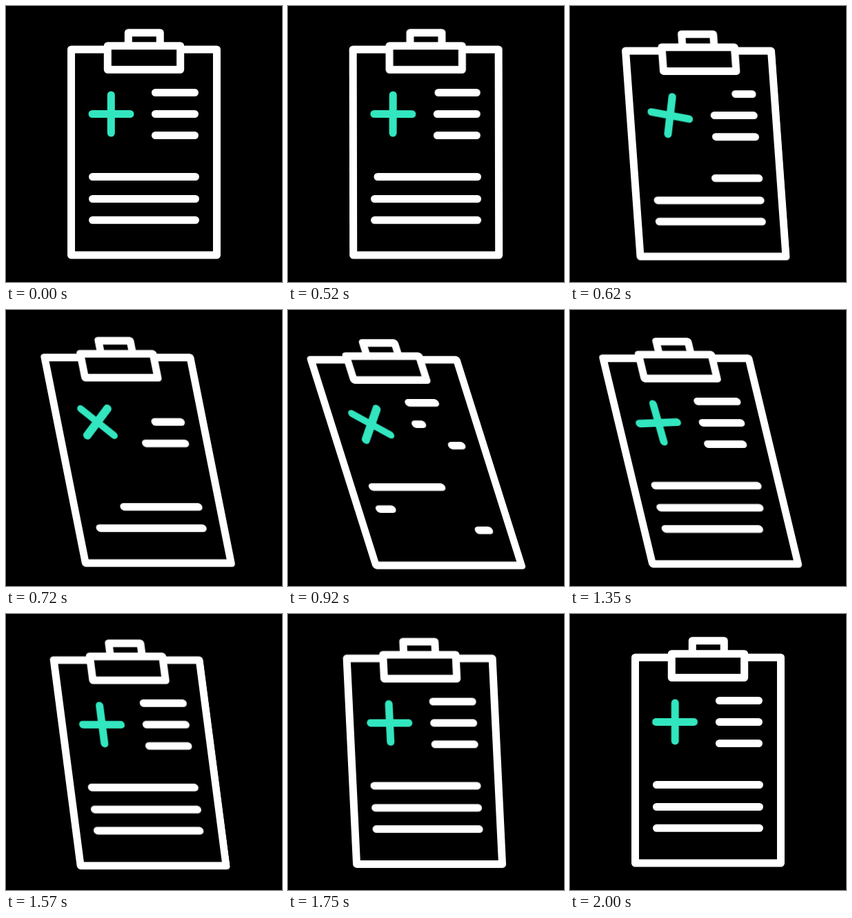
Recreate the animation shown at these times as an HTML page. Size 400 by 400 pixels, loop 2.02 s.

```html
<!DOCTYPE html>
<html lang="en">
<head>
<meta charset="utf-8">
<title>Clipboard</title>
<style>
  html, body {
    margin: 0;
    width: 100%;
    height: 100%;
    overflow: hidden;
    background: #000;
  }
  svg {
    display: block;
    width: 100%;
    height: 100%;
    fill: none;
    stroke: #fff;
    stroke-width: 11;
    stroke-linecap: round;
    stroke-linejoin: round;
  }
  .board, .cross, .rows path {
    animation: 2020ms linear infinite;
  }
  .board {
    transform-origin: 0 256.7px;
    animation-name: lean;
  }
  .clip { fill: #000; }
  .cross {
    stroke: #32e6bf;
    transform-origin: 152.3px 156.5px;
    animation-name: turn;
  }
  .rows path {
    stroke-dasharray: 100 300;
    animation-name: rewrite;
    animation-delay: var(--at);
  }

  /* Lean left for 500 ms, straighten over 1000 ms */
  @keyframes lean {
    0% { transform: translateY(0) skewX(0deg); }
    24.752% {
      transform: translateY(0) skewX(0deg);
      animation-timing-function: cubic-bezier(.33, 0, .33, 1);
    }
    49.505% {
      transform: translateY(9.3px) skewX(17.9deg);
      animation-timing-function: cubic-bezier(.41, 0, .64, 1);
    }
    99.01%, 100% { transform: translateY(0) skewX(0deg); }
  }

  @keyframes turn {
    0% { transform: rotate(0deg); }
    24.752% {
      transform: rotate(0deg);
      animation-timing-function: cubic-bezier(.33, 0, .2, 1);
    }
    74.257%, 100% { transform: rotate(180deg); }
  }

  /* Wipe out to the right in 225 ms, then draw again from the left in 680 ms */
  @keyframes rewrite {
    0% {
      stroke-dashoffset: 0;
      animation-timing-function: cubic-bezier(.33, 0, .67, 1);
    }
    11.139% { stroke-dashoffset: -101; }
    11.14% {
      stroke-dashoffset: 101;
      animation-timing-function: cubic-bezier(.19, .16, .08, 1);
    }
    44.802%, 100% { stroke-dashoffset: 0; }
  }
</style>
</head>
<body>
<svg viewBox="0 0 400 400">
  <g class="board">
    <path d="M94.5 63H305.5V361H94.5Z"/>
    <path d="M177.3 57V38.7H223.3V57"/>
    <path class="clip" d="M147.3 57.7H252.7V92.3H147.3Z"/>
    <path class="cross" d="M125 156.5H180M152.3 129V184"/>
    <g class="rows">
      <path pathLength="100" style="--at: 498ms" d="M216.5 125.5H273.5"/>
      <path pathLength="100" style="--at: 633ms" d="M216.5 156.5H273.5"/>
      <path pathLength="100" style="--at: 770ms" d="M216.5 187.5H273.5"/>
      <path pathLength="100" style="--at: 498ms" d="M125.5 247.5H274.5"/>
      <path pathLength="100" style="--at: 644ms" d="M125.5 279.5H274.5"/>
      <path pathLength="100" style="--at: 742ms" d="M125.5 310.3H274.5"/>
    </g>
  </g>
</svg>
</body>
</html>
```
